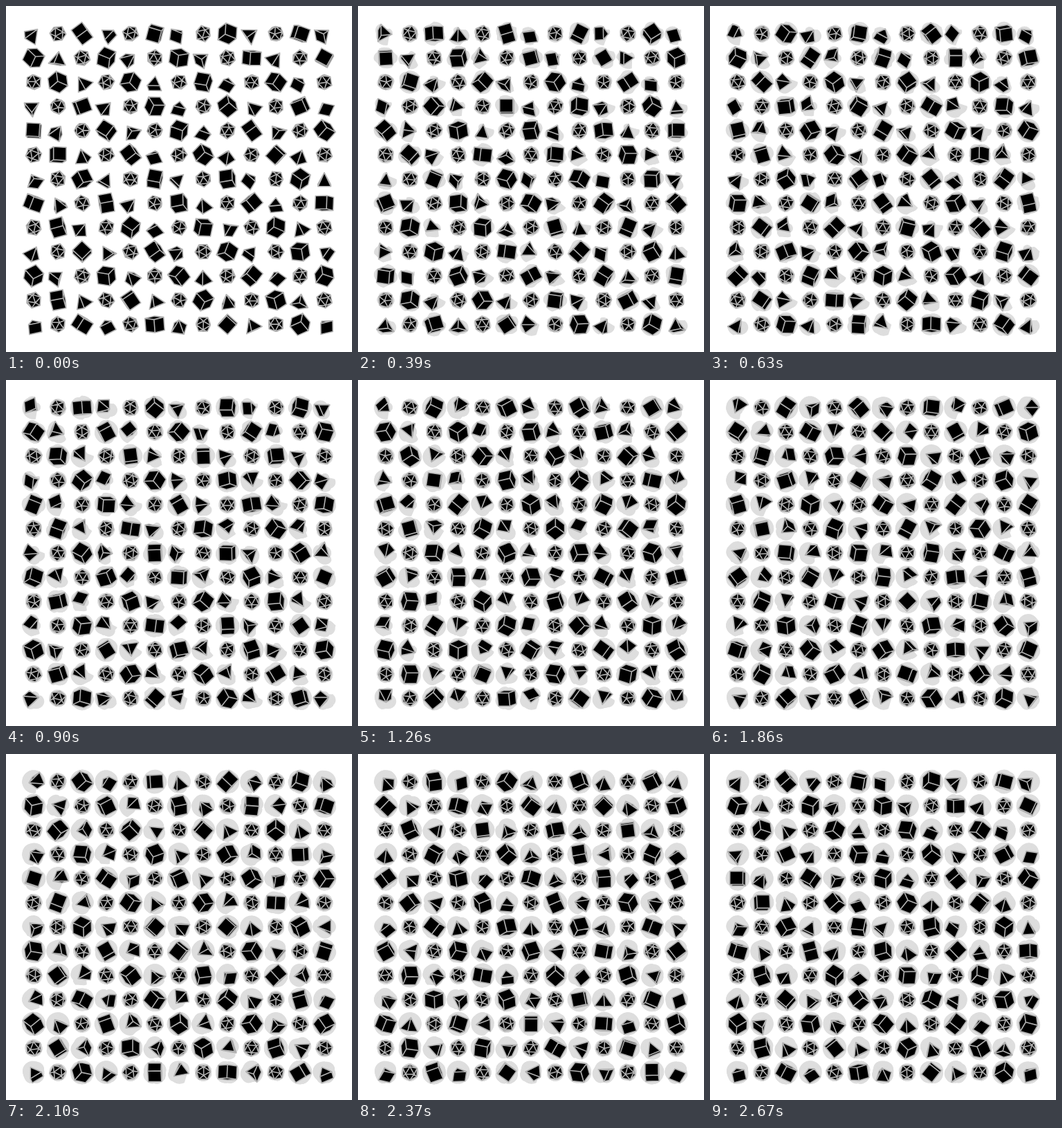
An HTML page with a canvas for the animation above (2.7 s loop, 500 by 500 pixels).

```html
<!DOCTYPE html>
<html lang="en">
<head>
<meta charset="utf-8">
<title>Tumbling solids</title>
<style>
  html, body { margin: 0; width: 100%; height: 100%; overflow: hidden; background: #fff; }
  canvas { display: block; width: 500px; height: 500px; }
</style>
</head>
<body>
<canvas id="stage" width="500" height="500"></canvas>
<script>
const SIZE = 500, CELLS = 13, PITCH = 35, MARGIN = 40;
const STEP_MS = 30, STEPS = 90, TAU = Math.PI * 2;
const FACE = '#000', EDGE = '#b2b2b2', TRAIL = '#dedede';
const MAX_TILT = 1;

const ctx = document.getElementById('stage').getContext('2d');
const trailCanvas = document.createElement('canvas');
trailCanvas.width = trailCanvas.height = SIZE;
const trail = trailCanvas.getContext('2d');

const sub = (a, b) => a.map((v, i) => v - b[i]);
const dot = (a, b) => a[0] * b[0] + a[1] * b[1] + a[2] * b[2];
const cross = (a, b) => [
  a[1] * b[2] - a[2] * b[1],
  a[2] * b[0] - a[0] * b[2],
  a[0] * b[1] - a[1] * b[0]
];

// Wind every face so that its normal points away from the centre.
function solid(points, faces) {
  return {
    points,
    faces: faces.map(face => {
      const [a, b, c] = face.map(i => points[i]);
      return dot(cross(sub(b, a), sub(c, a)), a) < 0 ? [...face].reverse() : face;
    })
  };
}

function makePyramid(h) {
  const points = [[-h, h, -h], [h, h, -h], [h, h, h], [-h, h, h], [0, -h, 0]];
  return solid(points, [[0, 1, 2, 3], [0, 1, 4], [1, 2, 4], [2, 3, 4], [3, 0, 4]]);
}

function makeCube(h) {
  const points = [];
  for (let i = 0; i < 8; i++) points.push([i & 1 ? h : -h, i & 2 ? h : -h, i & 4 ? h : -h]);
  return solid(points, [
    [0, 1, 3, 2], [4, 5, 7, 6], [0, 1, 5, 4],
    [2, 3, 7, 6], [0, 2, 6, 4], [1, 3, 7, 5]
  ]);
}

function makeIcosahedron(radius) {
  const phi = (1 + Math.sqrt(5)) / 2;
  const unit = radius / Math.hypot(1, phi), long = unit * phi;
  const points = [], faces = [];
  for (const u of [-unit, unit]) {
    for (const v of [-long, long]) points.push([0, u, v], [u, v, 0], [v, 0, u]);
  }
  const adjacent = (i, j) => Math.hypot(...sub(points[i], points[j])) < unit * 2.1;
  for (let i = 0; i < 12; i++)
    for (let j = i + 1; j < 12; j++)
      for (let k = j + 1; k < 12; k++)
        if (adjacent(i, j) && adjacent(j, k) && adjacent(i, k)) faces.push([i, j, k]);
  return solid(points, faces);
}

function seededRandom(seed) {
  return () => {
    seed = (Math.imul(seed, 1664525) + 1013904223) >>> 0;
    return seed / 4294967296;
  };
}

// Rotates about y, then x, then z.
function rotator(ax, ay, az) {
  const [cx, sx, cy, sy, cz, sz] = [ax, ay, az].flatMap(a => [Math.cos(a), Math.sin(a)]);
  return ([x, y, z]) => {
    [x, z] = [x * cy + z * sy, z * cy - x * sy];
    [y, z] = [y * cx - z * sx, y * sx + z * cx];
    return [x * cz - y * sz, x * sz + y * cz, z];
  };
}

const random = seededRandom(2718);
const tilt = () => (random() * 2 - 1) * MAX_TILT;
const kinds = [makePyramid(9.3), makeIcosahedron(12), makeCube(9.6)];
const items = [];
for (let row = 0; row < CELLS; row++) {
  for (let col = 0; col < CELLS; col++) {
    const { points, faces } = kinds[(col - row + CELLS * 3) % 3];
    items.push({
      faces,
      points: points.map(rotator(tilt(), random() * TAU, tilt())),
      x: MARGIN + col * PITCH,
      y: MARGIN + row * PITCH
    });
  }
}

function drawItem(g, item, spin) {
  const { faces, x, y } = item;
  const points = item.points.map(spin);
  g.beginPath();
  for (const face of faces) {
    const [a, b, c] = face.map(i => points[i]);
    if (cross(sub(b, a), sub(c, a))[2] <= 0) continue;
    face.forEach((p, i) => g[i ? 'lineTo' : 'moveTo'](x + points[p][0], y + points[p][1]));
    g.closePath();
  }
  g.fill();
  g.stroke();
}

function drawAll(g, step, fill, stroke) {
  const turn = step / STEPS * TAU;
  const spin = rotator(0, turn, turn);
  g.fillStyle = fill;
  g.strokeStyle = stroke;
  g.lineWidth = 1.6;
  g.lineJoin = 'round';
  for (const item of items) drawItem(g, item, spin);
}

let trailed = 0, shown = -1;

function render(step) {
  if (step === shown) return;
  if (step < trailed) {
    trail.clearRect(0, 0, SIZE, SIZE);
    trailed = 0;
  }
  // Every pose passed since the loop began leaves its silhouette behind.
  while (trailed < step) drawAll(trail, trailed++, TRAIL, TRAIL);
  shown = step;

  ctx.fillStyle = '#fff';
  ctx.fillRect(0, 0, SIZE, SIZE);
  ctx.drawImage(trailCanvas, 0, 0);
  drawAll(ctx, step, FACE, EDGE);
}

function tick() {
  render(Math.floor(performance.now() / STEP_MS) % STEPS);
  requestAnimationFrame(tick);
}
tick();
</script>
</body>
</html>
```
